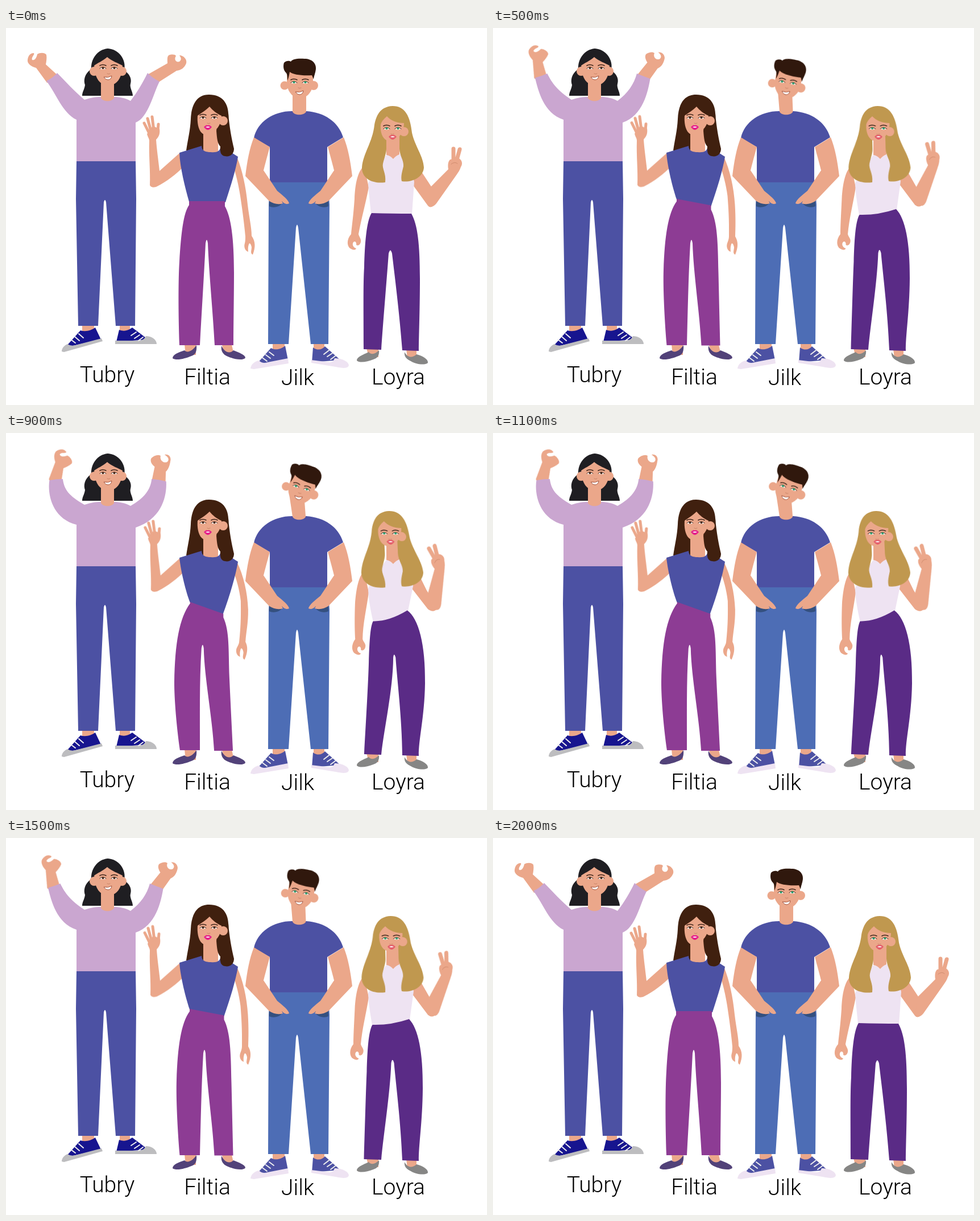
Animation of 846 by 662 pixels, one loop 2100 ms. Source, as an HTML page:

```html
<!DOCTYPE html>
<html lang="en">
<head>
<meta charset="utf-8">
<title>Team waving</title>
<style>
  html, body { margin: 0; width: 100%; height: 100%; overflow: hidden; background: #fff; }
  svg { display: block; width: 846px; height: 662px; }
  text { font: 300 39px Roboto, "Open Sans", sans-serif; text-anchor: middle; fill: #000; }

  /* Ten steps out, then eleven even poses back, 100 ms each. */
  .morph, .turn { animation: morph 2100ms steps(10) infinite; }
  .turn { animation-name: turn; }
  @keyframes morph {
    47.619% { d: var(--to); animation-timing-function: steps(11, jump-none); }
  }
  @keyframes turn {
    47.619% { transform: var(--to); animation-timing-function: steps(11, jump-none); }
  }

  .skin { fill: #eba78a; }
  .blue { fill: #4c51a3; }
  .lilac { fill: #caa6d0; }
  .pale { fill: #eee3f2; }
  .black { fill: #1f1e22; }
  .brown { fill: #40200f; }
  .dark { fill: #30180d; }
  .blond { fill: #c0984f; }
  .line { fill: none; stroke-linecap: round; }
  .laces { stroke: #eee; stroke-width: 2; }
</style>
</head>
<body>
<svg viewBox="0 0 846 662">
  <defs>
    <g id="eyes">
      <path class="line" stroke="#3a2117" stroke-width="1.5" d="M-15 -4Q-10 -7 -4 -4M5 -4Q10 -7 16 -4"/>
      <path fill="#fff" d="M-15 1Q-10 -4 -4 1Q-10 4 -15 1M5 1Q10 -4 16 1Q10 4 5 1"/>
      <path class="line" stroke="#3a2117" d="M-15 1Q-10 -4 -4 1M5 1Q10 -4 16 1"/>
      <circle cx="-9.500" cy="0.300" r="2" fill="currentColor"/>
      <circle cx="10.500" cy="0.300" r="2" fill="currentColor"/>
      <path class="line" stroke="#c98468" d="M-2 10Q0 12 3 10"/>
    </g>
    <g id="smile">
      <path fill="#fff" stroke="#a4553f" d="M-7 -1Q1 1 7 -3Q6 4 0 4Q-4 4 -7 -1Z"/>
    </g>
    <g id="lips">
      <path fill="currentColor" d="M-7 0Q-3 -5 0 -3Q3 -5 7 0Q3 5 0 5Q-3 5 -7 0Z"/>
      <path fill="#fff" d="M-4 0Q0 -2 4 0Q0 2 -4 0Z"/>
    </g>
    <g id="pocketArm">
      <path fill="#34507f" d="M463 303C470 308 478 308 487 304C485 314 470 317 463 313Z"/>
      <path class="skin" d="M436 192L464 209V236L453 250L477 286C487 294 497 302 498 308C493 311 488 307 485 304L487 308C478 311 470 308 463 304L421 260C424 235 428 212 436 192Z"/>
      <path fill="#fff" d="M464 209V262L453 250C456 238 460 223 464 209Z"/>
    </g>
  </defs>

  <!-- Person 1: both arms up -->
  <g>
    <path class="black" d="M179 36C160 38 149 55 150 72C138 80 136 92 139 100C138 108 134 112 134 119H223C223 112 217 104 219 98C222 88 216 80 208 74C212 55 198 37 179 36Z"/>
    <path class="skin turn" style="--to:translate(9px,-4px) rotate(63deg);transform-origin:80px 86px" d="M72 96L53 70C44 68 37 62 38 56C39 48 43 44 49 44C51 47 44 51 46 56C51 58 54 51 55 46C60 43 68 43 71 47C72 53 71 58 70 64L92 84L86 96Z"/>
    <path class="skin morph" style="--to:path('M257 86L259 59C252 54 250 49 252 44C257 39 264 36 269 39C267 46 274 53 281 50C286 45 282 41 276 37C284 35 288 42 286 48C285 57 282 64 279 67L282 88Z')" d="M247 83L284 62C284 56 283 51 286 48C291 46 297 46 299 49C295 55 299 61 305 59C310 55 307 51 305 48C312 48 319 55 317 62C314 70 308 74 300 75L267 96Z"/>
    <path class="lilac morph" style="--to:path('M124 235L124 161C78 150 71 105 77 82Q90 80 101 81C102 100 109 110 138 126C150 122 158 121 167 121L190 121C200 121 210 123 219 128C244 115 256 100 257 81Q270 81 283 84C286 110 277 150 228 166L228 235Z')" d="M124 235L124 161C100 150 88 115 71 93Q82 88 90 79C106 95 120 111 138 126C150 122 158 121 167 121L190 121C200 121 210 123 219 128C230 114 240 97 249 79Q258 88 270 94C259 115 250 158 228 166L228 235Z"/>
    <path class="skin" d="M167 90H190V123C186 130 171 130 167 123Z"/>
    <circle class="skin" cx="155" cy="76" r="8"/>
    <circle class="skin" cx="204" cy="76" r="8"/>
    <path class="skin" d="M178 51C170 58 160 62 155 66L157 80C160 92 168 101 180 101C192 101 200 92 203 80L205 66C198 62 186 58 178 51Z"/>
    <use href="#eyes" x="180" y="70" color="#4a2c1c"/>
    <use href="#smile" x="179" y="87"/>
    <path class="blue" d="M124 234H228L229 300L227 523H193L176 306Q174 298 172 306L162 523H127L123 300Z"/>
    <path class="skin" d="M134 523H155V533H134ZM200 523H218V533H200Z"/>
    <path fill="#17158f" d="M131 531C140 534 150 531 157 526L167 547L104 561ZM199 530C207 533 214 532 222 526L250 547L194 551Z"/>
    <path fill="#bdbdbf" d="M98 568C98 562 103 557 108 555Q114 559 122 557L168 545L170 550L102 569ZM192 549H234Q242 549 246 541C256 541 265 547 265 555H192Z"/>
    <path class="line laces" d="M128 537L136 544M121 542L129 549M114 547L122 553M229 534L220 540M235 539L226 545M241 543L233 549"/>
  </g>

  <!-- Person 2: small wave, hip sway -->
  <g>
    <path class="brown" d="M357 117C335 117 326 135 325 160C324 180 320 195 317 215H350V190H386L391 160C393 135 383 117 357 117Z"/>
    <g class="turn" style="--to:translate(2px,-1px)">
      <path class="skin" d="M248 186C249 191 252 194 252 198C251 225 254 250 253 276C255 281 262 280 266 278C282 270 300 256 312 244L306 219L270 251C268 232 265 212 264 196C270 190 271 184 270 177L258 172Z"/>
      <path class="line" stroke="#eba78a" stroke-width="5" d="M253 187L243 167M255 181L249 159M260 180L257 156M267 180L268 169"/>
    </g>
    <path class="skin morph" style="--to:path('M406 226C418 250 425 280 426 310C426 335 421 350 420 367C424 375 424 385 418 398C413 396 416 390 416 385C415 379 412 376 411 380C409 386 410 390 410 393C404 391 402 384 404 378C406 374 409 370 409 366C413 335 413 315 413 295C411 275 405 255 400 244Z')" d="M406 226C416 250 422 280 425 310C428 335 432 350 432 365C439 375 439 385 434 398C429 396 432 390 432 385C431 379 428 376 427 380C425 386 426 390 426 393C420 391 418 384 420 378C421 374 421 370 421 366C418 335 415 315 412 295C409 275 404 255 400 244Z"/>
    <path class="skin" d="M314 556H334V574H316ZM380 556H397L401 574H384Z"/>
    <path fill="#524279" d="M293 580C293 573 305 569 314 566C319 572 329 566 335 557C336 568 333 574 326 576C316 580 300 585 293 580ZM379 558C384 569 393 573 400 566C410 570 421 574 421 579C418 584 404 582 396 579C386 576 377 571 379 558Z"/>
    <path class="skin" d="M347 178H373V220H347Z"/>
    <path class="blue morph" style="--to:path('M305 219L344 207C344 216 352 218 360 218C370 219 377 217 378 207L408 226C404 250 394 285 381 320L324 297C317 280 308 245 305 219Z')" d="M305 219L344 207C344 216 352 218 360 218C370 219 377 217 378 207L408 226C404 250 396 275 386 306L322 305C315 280 306 245 305 219Z"/>
    <path class="morph" fill="#8d3c94" style="--to:path('M324 296L382 319L382 325C393 350 390 380 392 430C394 470 397 520 399 558L366 558C363 500 348 430 347 378Q345 366 343 378C339 440 341 500 341 557L306 557C300 520 295 470 295 440C296 370 304 325 324 298Z')" d="M322 304L385 304L385 313C396 332 401 370 401 430C401 470 400 520 400 557L367 557C364 500 357 430 355 378Q353 366 351 378C348 440 344 500 341 557L305 557C303 500 303 440 305 410C308 360 312 325 322 311Z"/>
    <path class="brown" d="M377 150H391C393 175 397 195 401 212C401 222 393 227 385 225C378 224 376 218 377 208C372 203 371 194 370 180Z"/>
    <circle class="skin" cx="382" cy="163" r="8"/>
    <path class="skin" d="M358 138C350 146 342 150 337 154C336 165 338 178 344 184C350 190 359 189 365 183C373 176 379 167 379 154C370 150 364 145 358 138Z"/>
    <use href="#eyes" x="356" y="157" color="#4a2c1c"/>
    <use href="#lips" x="355" y="174" color="#e5208a"/>
  </g>

  <!-- Person 3: hands in pockets, head tilt -->
  <g>
    <path class="blue" d="M503 146H528C560 148 585 165 593 192L565 209V272H464V209L436 193C442 165 470 146 503 146Z"/>
    <path fill="#4d6db5" d="M464 271H566L569 310L567 555H536L514 351Q512 340 510 351L497 555H461L462 310Z"/>
    <use href="#pocketArm"/>
    <use href="#pocketArm" transform="translate(1030) scale(-1 1)"/>
    <path class="skin" d="M469 555H490V568H469ZM541 555H560V568H541Z"/>
    <path class="blue" d="M466 562C475 567 485 563 491 558L496 583L440 591ZM540 561C548 567 556 565 561 559L588 583L538 587Z"/>
    <path class="pale" d="M430 598C431 590 438 585 445 584Q451 590 460 587L496 580L497 589L436 599ZM537 583L570 587Q576 586 578 580C590 580 602 585 603 592C602 599 590 597 580 595L537 588Z"/>
    <path class="line laces" d="M463 569L471 575M457 574L465 580M451 579L459 585M568 566L559 573M574 571L565 577M579 576L571 582"/>
    <path class="skin morph" style="--to:path('M497 105L524 112L527 147C524 154 507 154 504 147Z')" d="M504 105L528 105L528 147C524 154 507 154 504 147Z"/>
    <g class="turn" style="--to:translate(1px,0px) rotate(19deg);transform-origin:515px 103px">
      <circle class="skin" cx="490" cy="101" r="7.500"/>
      <circle class="skin" cx="541" cy="101" r="8"/>
      <path class="skin" d="M495 72H540V100C537 115 528 123 517 123C506 123 497 115 494 100V80Z"/>
      <path class="dark" d="M495 92C495 86 495 82 493 79C488 75 487 67 489 61C493 57 498 57 501 59C503 54 515 53 525 54C538 54 546 62 545 72C544 80 542 83 541 90L538 83C520 84 505 82 499 77C498 82 497 88 495 92Z"/>
      <use href="#eyes" x="516" y="95" color="#2c9a6a"/>
      <use href="#smile" x="516" y="113"/>
    </g>
  </g>

  <!-- Person 4: peace sign, hip sway -->
  <g>
    <path class="skin morph" style="--to:path('M630 242C620 252 616 275 614 300C613 330 614 350 615 362C609 370 608 380 613 386C618 390 623 391 625 387C620 386 617 380 620 376C623 373 626 377 625 381C630 384 634 378 633 372C632 368 629 366 628 362C628 335 634 310 638 280Z')" d="M630 242C618 252 614 275 613 300C611 330 608 350 607 362C600 370 599 380 604 386C609 390 614 391 616 387C611 386 608 380 611 376C614 373 617 377 616 381C621 384 625 378 624 372C623 368 621 366 620 362C625 335 632 310 638 280Z"/>
    <path class="skin morph" style="--to:path('M720 236L739 276L760 307Q753 317 742 309L713 272Z')" d="M720 236L749 280L756 307Q748 319 742 312L713 272Z"/>
    <g class="turn" style="--to:translate(4px,-1px) rotate(-33deg);transform-origin:748px 296px">
      <path class="skin" d="M746 280L778 248C777 242 777 235 781 231L795 228C802 231 804 238 800 244C798 250 795 254 793 257L757 308Q750 317 743 311Z"/>
      <path class="line" stroke="#eba78a" stroke-width="7" d="M787 235L787 212M792 235L798 213"/>
      <path class="line" stroke="#c98468" stroke-width=".8" d="M783 239Q789 234 794 238"/>
    </g>
    <path class="skin" d="M634 562H655V578H638ZM704 564H722V580H706Z"/>
    <path fill="#868685" d="M617 584C617 577 630 573 638 569C643 575 650 572 656 566C657 575 653 580 646 582C636 586 622 589 617 584ZM701 569C706 579 715 580 722 573C734 576 743 582 742 588C736 593 720 590 712 585C704 581 700 577 701 569Z"/>
    <path class="morph pale" style="--to:path('M668 224C672 222 676 224 681 230C686 224 690 222 694 222C705 240 713 255 716 268L706 312Q670 333 646 331C641 310 637 290 637 272L650 250Z')" d="M668 224C672 222 676 224 681 230C686 224 690 222 694 222C705 240 715 255 718 270L714 327Q680 327 642 326C640 305 638 290 637 272L650 250Z"/>
    <path class="morph" fill="#5a2b86" style="--to:path('M646 331Q672 332 705 310C726 324 739 370 738 440C737 500 725 540 726 567L697 566C697 500 688 430 686 394Q683 384 682 394C682 450 665 520 660 565L630 564C634 500 638 440 639 400C640 370 641 340 646 331Z')" d="M643 325Q680 326 713 326C724 345 728 380 728 440C728 500 726 540 726 567L697 566C692 500 683 430 679 396Q676 385 673 396C669 450 663 520 660 565L629 564C629 500 628 450 630 420C631 380 634 338 643 325Z"/>
    <path class="skin" d="M669 190H692V222Q686 224 681 230Q676 224 669 223Z"/>
    <g class="turn" style="--to:skewX(3deg);transform-origin:682px 268px">
      <path class="blond" d="M680 137C657 138 651 155 648 170C645 200 628 220 626 245C626 265 645 274 667 271C669 255 661 247 663 238C666 226 669 220 669 212V170H692V212C692 224 700 232 699 243C697 252 694 260 696 269C712 272 734 263 735 245C734 225 719 207 714 184C711 155 702 137 680 137Z"/>
      <circle class="skin" cx="700" cy="182" r="8"/>
      <path class="skin" d="M670 155C664 160 660 165 659 170C658 183 662 193 669 197Q678 202 686 196C694 190 700 180 700 167C688 167 677 163 670 155Z"/>
      <use href="#eyes" x="679" y="176" color="#2c9a6a"/>
      <use href="#lips" x="680" y="191" color="#e4606c"/>
    </g>
  </g>

  <text x="178" y="622">Tubry</text>
  <text x="354" y="626">Filtia</text>
  <text x="513" y="627">Jilk</text>
  <text x="690" y="626">Loyra</text>
</svg>
</body>
</html>
```
